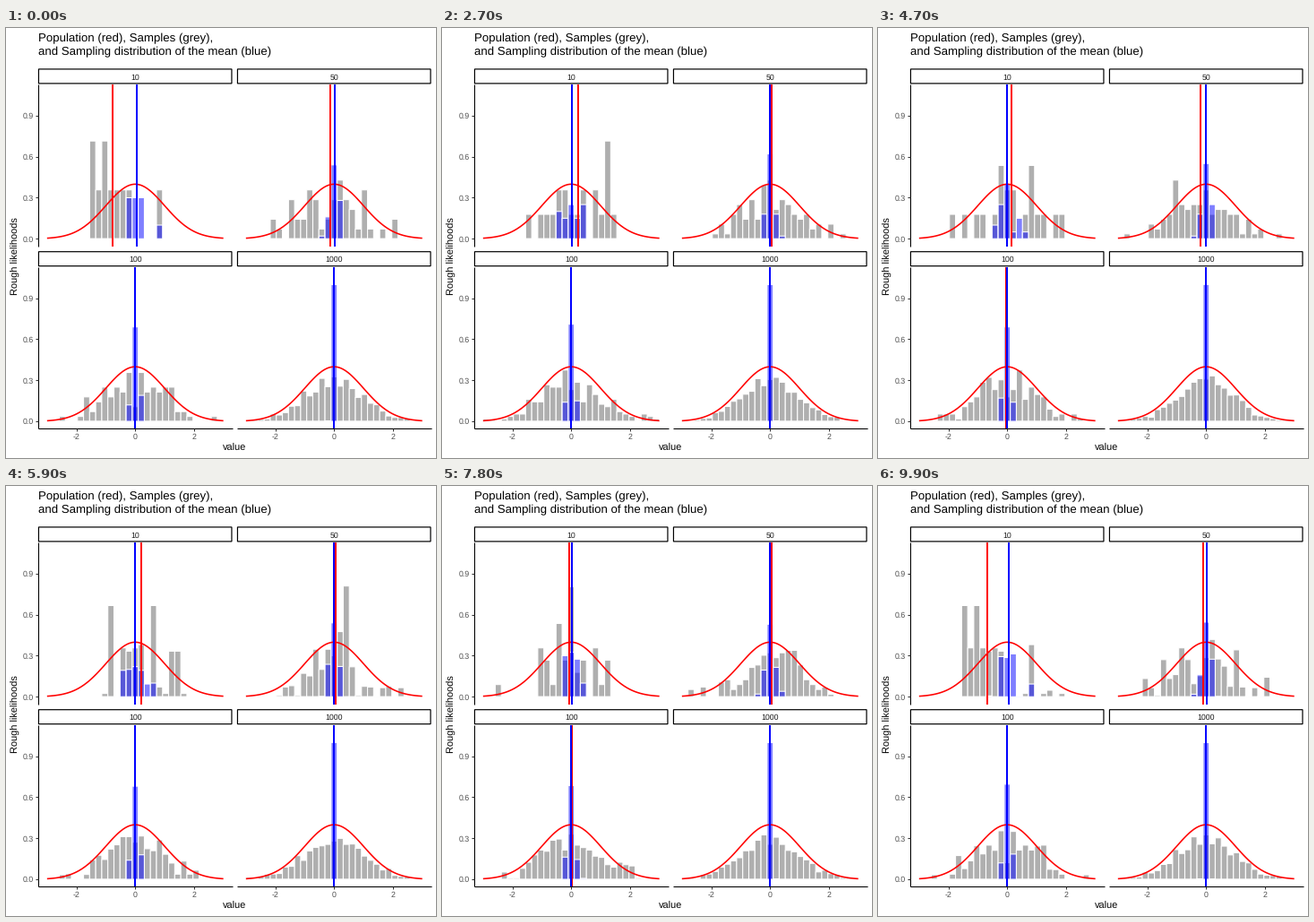
A matplotlib script that plays this animation: 480x480 px, repeating every 10000 ms.

```python
import numpy as np
import matplotlib.pyplot as plt
from matplotlib.animation import FuncAnimation
from matplotlib.collections import PolyCollection
from matplotlib.patches import Rectangle

plt.rcParams["font.family"] = "Liberation Sans"
plt.rcParams["text.hinting"] = "no_hinting"

SIZE, DPI = 480, 72           # one point is one pixel
FRAMES, STATES = 100, 10
UNIT_X, UNIT_Y = 32.8, 152.8  # pixels per data unit
BIN = 6 / 29
KS = np.arange(-14, 15)
LEFT, RIGHT, UPPER, LOWER = 144.25, 366.25, 63, 266.8
GREY, TEXT = "#afafaf", "#4d4d4d"

# Sample mean in each state, by sample size; the largest sample stays at zero.
SAMPLE_MEANS = {
    10: [-0.76, 0.14, 0.42, 0.06, -0.1, 0.4, 0.18, -0.43, 0.06, 0.6],
    50: [-0.12, 0.08, 0.1, 0.02, -0.06, -0.3, 0.09, 0.27, 0, 0],
    100: [0, -0.03, 0, 0, -0.03, -0.03, 0, 0.09, 0, 0],
    1000: [0] * STATES,
}
rng = np.random.default_rng(7)


def shares(mean, sd, n, limit=1.0):
    """Share per bin of n normal draws centred on `mean`, none above `limit`."""
    while True:
        x = rng.normal(0, sd, n)
        ks = np.rint((x - x.mean() + mean) / BIN).astype(int)
        out = np.bincount(np.clip(ks, -14, 14) + 14, minlength=len(KS)) / n
        if out.max() <= limit:
            return out


def line(xs, ys, color, lw, z, **kw):
    return ax.plot(xs, ys, color=color, lw=lw, zorder=z,
                   solid_capstyle="butt", **kw)[0]


def label(x, y, s, size, ha="left", color="black", **kw):
    ax.text(x, y, s, size=size, ha=ha, color=color, zorder=7,
            **{"va": "baseline", **kw})


class Panel:
    def __init__(self, n, cx, top):
        self.cx, self.base = cx, top + 172.3
        sample_means = np.array(SAMPLE_MEANS[n])
        # The mean of the sampling distribution drifts slowly around zero.
        drift = 0.6 / n * np.cos(np.pi * np.arange(STATES) / STATES) ** 2
        samples = np.array([shares(m, 1, n, 0.3) for m in sample_means])
        means = np.array([shares(m, n ** -0.5, n) for m in drift])

        self.layers = [(self.bars(GREY, 1), samples / 0.28),
                       (self.bars((0, 0, 1, 0.5), 2), means)]
        xs = np.linspace(-3, 3, 101)
        density = np.exp(-xs ** 2 / 2) / np.sqrt(2 * np.pi)
        line(cx + xs * UNIT_X, self.base - density * UNIT_Y, "red", 1.6, 3)
        span = [top, top + 180.5]
        self.rules = [(line([cx, cx], span, color, 2, z, snap=True), m)
                      for color, m, z in (("red", sample_means, 4),
                                          ("blue", drift, 5))]
        ax.add_patch(Rectangle((cx - 107.8, top - 17.1), 215.5, 16, fc="white",
                               ec="black", lw=1.2, zorder=6, snap=False))
        label(cx, top - 5.4, str(n), 8.8, "center", "#1a1a1a")

    def bars(self, color, z):
        return ax.add_collection(PolyCollection(
            [], facecolors=[color], edgecolors="white", linewidths=1.07,
            zorder=z, snap=False), autolim=False)

    def show(self, a, b, t):
        def mix(states):
            return states[a] + (states[b] - states[a]) * t

        left = self.cx + (KS - 0.5) * BIN * UNIT_X
        right = left + BIN * UNIT_X
        for coll, heights in self.layers:
            tops = self.base - mix(heights) * UNIT_Y
            coll.set_verts([[(l, self.base), (l, y), (r, y), (r, self.base)]
                            for l, r, y in zip(left, right, tops)])
        for rule, means in self.rules:
            x = self.cx + mix(means) * UNIT_X
            rule.set_xdata([x, x])


fig = plt.figure(figsize=(SIZE / DPI, SIZE / DPI), dpi=DPI, facecolor="white")
ax = fig.add_axes([0, 0, 1, 1])
ax.set_xlim(0, SIZE)
ax.set_ylim(SIZE, 0)
ax.axis("off")

panels = [Panel(10, LEFT, UPPER), Panel(50, RIGHT, UPPER),
          Panel(100, LEFT, LOWER), Panel(1000, RIGHT, LOWER)]

for top in (UPPER, LOWER):
    line([36, 36], [top, top + 180.5], "black", 1.07, 6)
    for v in (0, 0.3, 0.6, 0.9):
        y = top + 172.3 - v * UNIT_Y
        line([33.2, 36], [y, y], "#333333", 1.07, 6)
        label(31, y + 3.2, f"{v:.1f}", 8.8, "right", TEXT)
for cx in (LEFT, RIGHT):
    line([cx - 108.25, cx + 108.25], [447, 447], "black", 1.07, 6)
    for v in (-2, 0, 2):
        x = cx + v * UNIT_X
        line([x, x], [447, 450.3], "#333333", 1.07, 6)
        label(x, 459, str(v), 8.8, "center", TEXT)

label(36, 15, "Population (red), Samples (grey),", 13.2)
label(36, 30, "and Sampling distribution of the mean (blue)", 13.2)
label(255, 471.5, "value", 11, "center")
label(11, 255, "Rough likelihoods", 11, "center", va="center", rotation=90)


def update(frame):
    state, step = divmod(frame, 10)
    # The first move starts one step earlier than the others.
    hold = 3 if state == 0 else 4
    t = max(0, step - hold) / (10 - hold)
    eased = (1 - np.cos(np.pi * t)) / 2
    for panel in panels:
        panel.show(state, (state + 1) % STATES, eased)
    return []


anim = FuncAnimation(fig, update, frames=FRAMES, interval=100, repeat=True,
                     repeat_delay=0, blit=False)
plt.show()
```
